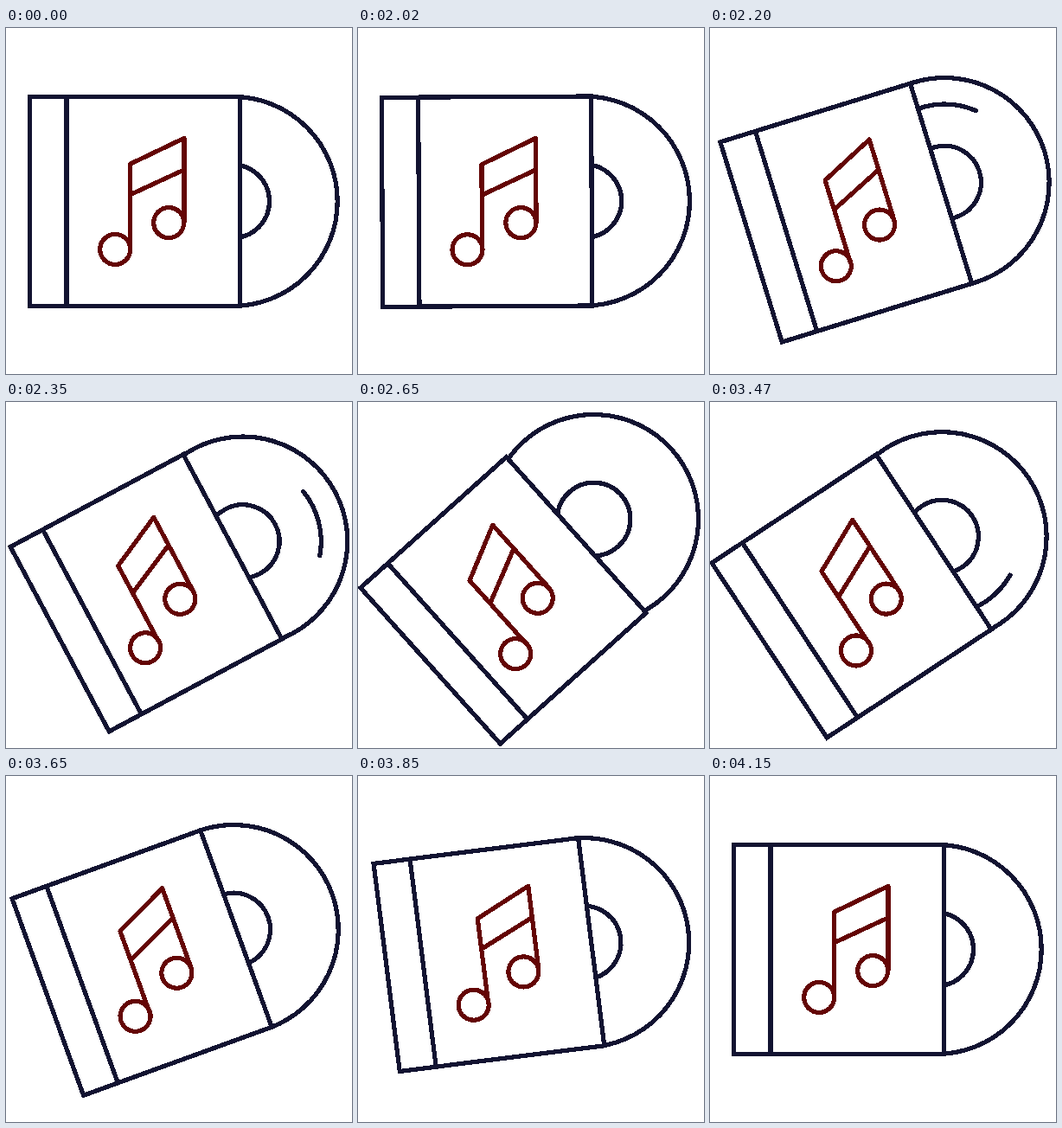
An HTML page for the animation above (4170 ms loop, 400 by 400 pixels).

```html
<!DOCTYPE html>
<html>
<head>
<meta charset="utf-8">
<style>
  html, body { margin: 0; width: 100%; height: 100%; overflow: hidden; background: #fff; }
  svg { display: block; width: 100vw; height: 100vh; }
</style>
</head>
<body>
<svg viewBox="0 0 400 400" fill="none" stroke="#121331" stroke-width="5.2" shape-rendering="crispEdges">
  <!-- coordinates are relative to the stage centre -->
  <g id="all">
    <g id="disc">
      <circle r="121"/>
      <circle r="42.3"/>
      <path id="shine" d="M82-38.3A90.5 90.5 0 0 1 82 38.3" stroke-linecap="round"/>
    </g>
    <path id="cover" fill="#fff"/>
    <path id="spine"/>
    <g stroke="#640505" stroke-linejoin="round" stroke-linecap="round">
      <circle cx="-74" cy="55.5" r="17.5"/>
      <circle cx="-12" cy="24.7" r="17.5"/>
      <path d="M-57 55.5V-43L5.7-73V24.7M-57-7.5L5.7-36.5"/>
    </g>
  </g>
</svg>
<script>
const LOOP = 4170, START = 2018, END = 4150;
const el = id => document.getElementById(id);
const part = (t, from, to) => Math.min(1, Math.max(0, (t - from) / (to - from)));
const easeOut = u => 1 - (1 - u) ** 2;
const sineOut = u => Math.sin(u * Math.PI / 2);
const easeInOut = u => u < .5 ? 2 * u * u : 1 - 2 * (1 - u) ** 2;

// 0 -> 1 in the first span, back to 0 in the second
const swing = (t, ease, up, back, end) =>
  ease(part(t, START, up)) - easeInOut(part(t, back, end));

function draw(t) {
  const tilt = -45 * swing(t, easeOut, 2877, 3090, END);
  const discX = 62 + 40 * swing(t, sineOut, 2942, 3090, 3840);
  const left = -172.5 + 16 * swing(t, easeOut, 2350, 3321, END);
  const spin = 160 + 720 * easeOut(part(t, 2005, END));

  el('all').setAttribute('transform', `translate(200.2 200.4) rotate(${tilt})`);
  el('disc').setAttribute('transform', `translate(${discX} 0)`);
  el('shine').setAttribute('transform', `rotate(${spin})`);
  el('cover').setAttribute('d', `M${left}-121H70V121H${left}Z`);
  el('spine').setAttribute('d', `M${left + 42.3}-121V121`);
}

const begin = performance.now();
function tick() {
  draw((performance.now() - begin) % LOOP);
  requestAnimationFrame(tick);
}
tick();
</script>
</body>
</html>
```
